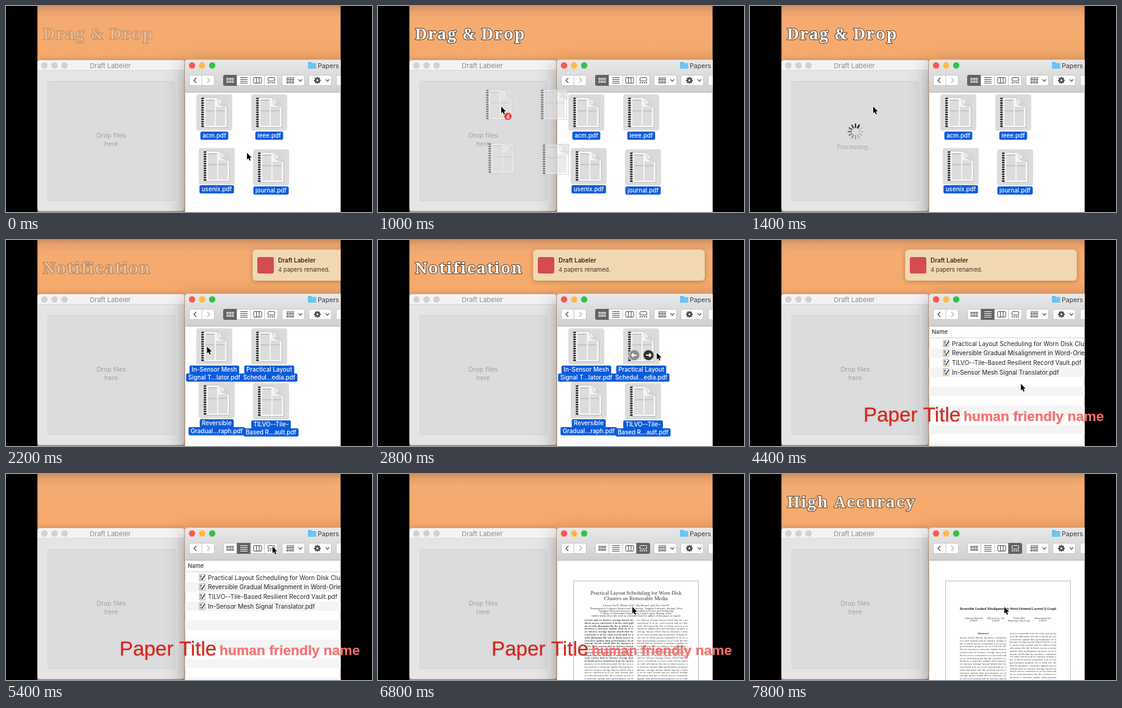
Recreate the animation shown at these times as an HTML page with a canvas. Size 600 by 338 pixels, loop 8000 ms.

```html
<!DOCTYPE html>
<html lang="en">
<head>
<meta charset="utf-8">
<title>Drag and drop renaming</title>
<style>
html, body { margin: 0; width: 100%; height: 100%; overflow: hidden; background: #000; }
canvas { display: block; }
</style>
</head>
<body>
<canvas id="stage" width="600" height="338"></canvas>
<script>
const ctx = document.getElementById('stage').getContext('2d');
const LOOP = 8000, STEP = 200;
const UI = 'Inter, sans-serif', SERIF = '"Liberation Serif", serif';
const APP = 'Draft Labeler';

const files = [
  { x: 312, y: 145, old: 'acm.pdf', label: ['In-Sensor Mesh', 'Signal T...lator.pdf'] },
  { x: 402, y: 145, old: 'ieee.pdf', label: ['Practical Layout', 'Schedul...edia.pdf'] },
  { x: 316, y: 233, old: 'usenix.pdf', label: ['Reversible', 'Gradual...raph.pdf'] },
  { x: 405, y: 235, old: 'journal.pdf', label: ['TILVO--Tile-', 'Based R...ault.pdf'] },
];
const listing = [
  'Practical Layout Scheduling for Worn Disk Clusters.pdf',
  'Reversible Gradual Misalignment in Word-Oriented.pdf',
  'TILVO--Tile-Based Resilient Record Vault.pdf',
  'In-Sensor Mesh Signal Translator.pdf',
];
const pointerPath = [
  [0, 395, 241], [400, 345, 178], [1000, 202, 165], [1800, 202, 165],
  [2600, 457, 185], [2800, 457, 185], [3400, 390, 121], [3600, 390, 121],
  [4400, 444, 236], [4800, 444, 236], [5400, 437, 119], [5600, 437, 119],
  [6400, 417, 218], [8000, 417, 218],
];
const words = ('the storage of system data is memory to layout with and performance in a block which ' +
  'allocation we propose for structure access that file latency on each update consistent by').split(' ');

const clamp = v => Math.max(0, Math.min(1, v));
const ease = (t, from, to) => { const p = clamp((t - from) / (to - from)); return p * p * (3 - 2 * p); };
const mix = (a, b, p) => a + (b - a) * p;

function pointerAt(t) {
  const i = Math.max(1, pointerPath.findIndex(k => k[0] > t));
  const [t0, x0, y0] = pointerPath[i - 1], [t1, x1, y1] = pointerPath[i];
  const p = ease(t, t0, t1);
  return [mix(x0, x1, p), mix(y0, y1, p)];
}

function scoped(draw) { ctx.save(); draw(); ctx.restore(); }

function box(x, y, w, h, r, fill, stroke) {
  ctx.beginPath();
  ctx.roundRect(x, y, w, h, r);
  if (fill) { ctx.fillStyle = fill; ctx.fill(); }
  if (stroke) { ctx.strokeStyle = stroke; ctx.lineWidth = 1; ctx.stroke(); }
}

function dot(x, y, r, fill) {
  ctx.beginPath();
  ctx.arc(x, y, r, 0, 7);
  ctx.fillStyle = fill;
  ctx.fill();
}

function path(points, color, width = 1, fill) {
  ctx.beginPath();
  points.forEach(([x, y]) => ctx.lineTo(x, y));
  if (fill) { ctx.closePath(); ctx.fillStyle = fill; ctx.fill(); }
  if (color) { ctx.strokeStyle = color; ctx.lineWidth = width; ctx.stroke(); }
}

function text(s, x, y, font, color, align = 'left') {
  ctx.font = font;
  ctx.textAlign = align;
  ctx.fillStyle = color;
  ctx.fillText(s, x, y);
}

function vertical(y0, y1, ...stops) {
  const g = ctx.createLinearGradient(0, y0, 0, y1);
  stops.forEach(([at, color]) => g.addColorStop(at, color));
  return g;
}

function title(s, alpha) {
  if (alpha <= 0) return;
  scoped(() => {
    ctx.globalAlpha = alpha;
    ctx.font = '800 26px "Noto Serif", serif';
    ctx.letterSpacing = '1.6px';
    ctx.textAlign = 'left';
    ctx.lineJoin = 'round';
    ctx.lineWidth = 2;
    ctx.strokeStyle = '#4a3c30';
    ctx.strokeText(s, 60.5, 55);
    ctx.fillStyle = '#fff';
    ctx.fillText(s, 60.5, 55);
  });
}

function dropWindow(t) {
  box(51.5, 88.5, 241, 248, 4, '#e6e5e6', '#c9b09b');
  box(52, 89, 240, 17, [4, 4, 0, 0], '#f4f3f4');
  ctx.fillStyle = '#d8d7d8';
  ctx.fillRect(52, 105, 240, 1);
  [63, 79.5, 96].forEach(x => dot(x, 97.5, 5.2, '#d2d1d2'));
  text(APP, 171, 101.7, '11px ' + UI, '#8c8b8c', 'center');
  box(68.5, 123.5, 208, 196, 3, '#dcdbdd', '#d3d2d4');
  if (t >= 1200 && t < 2200) {
    const turn = Math.floor((t - 1400) / 83);
    for (let i = 0; i < 12; i++) scoped(() => {
      ctx.translate(173, 206);
      ctx.rotate((i + turn + 2) * Math.PI / 6);
      const shade = Math.round(mix(195, 15, (i / 11) ** 1.8));
      ctx.lineCap = 'round';
      path([[0, -7], [0, -12]], `rgb(${shade},${shade},${shade})`, 2.3);
    });
    text('Processing...', 172, 235, '9.7px ' + UI, '#a9a8aa', 'center');
  } else {
    text('Drop files', 172.5, 216, '10.6px ' + UI, '#a3a2a4', 'center');
    text('here', 172.5, 230, '10.6px ' + UI, '#a3a2a4', 'center');
  }
}

// Rows of small outlined tiles, three to a row.
function tiles(x, y, rows, color) {
  ctx.strokeStyle = color;
  ctx.lineWidth = .9;
  for (let i = 0; i < rows * 3; i++)
    ctx.strokeRect(x - 5.5 + (i % 3) * 4.3, y + Math.floor(i / 3) * 4.6, 2.4, 2.4);
}

function viewGlyph(i, x, color) {
  if (i === 0) tiles(x, 118.5, 2, color);
  if (i === 1) [117.5, 120.5, 123.5, 126.5].forEach(y => path([[x - 6, y], [x + 6, y]], color));
  if (i === 2) {
    box(x - 6.5, 117.5, 13, 9, 1, null, color);
    [x - 2, x + 2.5].forEach(v => path([[v, 118], [v, 126]], color));
  }
  if (i === 3) {
    box(x - 5.5, 117.5, 11, 5.5, 1, null, color);
    ctx.fillStyle = color;
    for (let k = 0; k < 4; k++) ctx.fillRect(x - 6 + k * 3.4, 125, 1.8, 1.8);
  }
}

function chevron(x, y, dx, dy, color) {
  const side = dx ? [[x - dx, y - 4], [x + dx, y], [x - dx, y + 4]] : [[x - 3, y - dy], [x, y + dy], [x + 3, y - dy]];
  path(side, color, 1.3);
}

function toolbar(view) {
  const ink = '#4c4b4c', edge = '#c6c5c6';
  box(293.5, 88.5, 270, 53, [4, 0, 0, 0], vertical(88, 141, [0, '#e9e8e9'], [1, '#d1d0d1']));
  ctx.fillStyle = '#b5b4b5';
  ctx.fillRect(293.5, 141, 257, 1);
  dot(305, 97.5, 5.2, '#fc5753');
  dot(321.5, 97.5, 5.2, '#fdbc40');
  dot(338, 97.5, 5.2, '#34c24a');
  box(495, 92, 6, 4, 1, '#55b5e5');
  box(495, 93.5, 13.5, 9.5, 1, '#6cc5f1');
  text('Papers', 511, 101.7, '10.6px ' + UI, '#3b3a3b');

  [[300, 42], [356, 90], [452, 38], [496, 38], [541, 30]].forEach(([x, w]) =>
    box(x + .5, 113.5, w - 1, 17, 3, '#fcfcfc', edge));
  path([[321, 114], [321, 131]], edge);
  chevron(310, 122, -2, 0, ink);
  chevron(332, 122, 2, 0, '#b5b4b5');
  for (let i = 0; i < 4; i++) {
    const x = 356 + i * 22.5;
    if (i) path([[x, 114], [x, 130]], edge);
    if (i === view) box(x, 113, 22.5, 18, [i ? 0 : 3, i < 3 ? 0 : 3, i < 3 ? 0 : 3, i ? 0 : 3], '#646364');
    viewGlyph(i, x + 11.5, i === view ? '#fff' : ink);
  }
  path([[460, 117.3], [472.5, 117.3]], ink, .9);
  tiles(466, 119.5, 2, ink);
  chevron(482.5, 122, 0, 1.6, ink);
  for (let i = 0; i < 8; i++) scoped(() => {
    ctx.translate(510.5, 122);
    ctx.rotate(i * Math.PI / 4);
    path([[0, -3], [0, -5.6]], ink, 2);
  });
  dot(510.5, 122, 4.4, ink);
  dot(510.5, 122, 1.7, '#fcfcfc');
  chevron(527, 122, 0, 1.6, ink);
}

function documentIcon(x, y) {
  box(x + 10.5, y + 5, 40, 49.5, 0, '#f4f4f4', '#bbb');
  for (let i = 0; i < 22; i++) {
    ctx.fillStyle = i === 0 || i === 9 ? '#999' : '#c6c6c6';
    const top = y + 9 + i * 1.95;
    ctx.fillRect(x + 15, top, 15, 1);
    if (i > 5) ctx.fillRect(x + 32, top, 15, 1);
  }
  path([[x + 34, y + 4], [x + 52, y + 4], [x + 52, y + 22]], null, 1, '#d9d9d9');
  path([[x + 34, y + 4.5], [x + 37, y + 17], [x + 51, y + 21]], '#cdcdcd', 1, '#eeeeee');
  path([[x + 37, y + 17], [x + 44, y + 10.5], [x + 51, y + 21]], null, 1, '#d4d4d4');
  for (let i = 0; i < 13; i++) box(x + 8, y + 5.5 + i * 3.8, 4.6, 2.3, 1, '#222');
}

function iconView(renamed, arrows) {
  for (const { x, y, old, label } of files) {
    box(x, y, 59, 59.5, 4, '#dddcdd');
    documentIcon(x, y);
    const lines = renamed ? label : [old];
    const font = '500 9.8px ' + UI;
    ctx.font = font;
    lines.forEach((line, i) => {
      const w = ctx.measureText(line).width + 7;
      box(x + 29.5 - w / 2, y + 61 + i * 13, w, 13.6, 2.5, '#0b5bdc');
    });
    lines.forEach((line, i) => text(line, x + 29.5, y + 71.3 + i * 13, font, '#fff', 'center'));
  }
  if (arrows) [[420, -1, '#8d8d8d'], [443.5, 1, '#333']].forEach(([x, d, fill]) => {
    dot(x, 189, 9.5, '#d8d8d8');
    dot(x, 189, 8.3, fill);
    path([[x - 4 * d, 189], [x + 4 * d, 189]], '#fff', 1.8);
    path([[x + d, 186], [x + 4 * d, 189], [x + d, 192]], '#fff', 1.8);
  });
}

function listView() {
  ctx.fillStyle = '#f4f4f5';
  for (let y = 178; y < 338; y += 31.2) ctx.fillRect(293.5, y, 257, 15.6);
  text('Name', 298, 154, '500 9.4px ' + UI, '#333');
  ctx.fillStyle = '#d4d3d4';
  ctx.fillRect(293.5, 160, 257, 1);
  listing.forEach((name, i) => {
    const y = 170 + i * 15.6;
    box(317, y - 5.5, 9, 11, 0, '#fff', '#aaa');
    box(318, y - 4, 3, 4, 0, '#5a9ed0');
    box(318, y + 1, 5, 3, 0, '#d9a44a');
    path([[326, y - 4], [321, y + 4]], '#4b4038', 1.6);
    text(name, 331, y + 3.7, '10px ' + UI, '#272627');
  });
}

// Justified filler text; each line packs in every word that still fits.
function column(x, y, w, seed, boldLines = 0) {
  for (let row = 0; y < 342; row++, y += 4.8) {
    ctx.font = `${row < boldLines ? 'bold ' : ''}4.6px ${SERIF}`;
    const line = [];
    for (let k = 0; k < words.length; k++) {
      const next = words[(seed + row * 11 + k * 7) % words.length];
      if (ctx.measureText([...line, next].join(' ')).width <= w) line.push(next);
    }
    const s = line.join(' ');
    scoped(() => {
      ctx.wordSpacing = (w - ctx.measureText(s).width) / Math.max(1, line.length - 1) + 'px';
      ctx.fillStyle = '#4a4a4a';
      ctx.textAlign = 'left';
      ctx.fillText(s, x, y);
    });
  }
}

function firstPage() {
  const centre = (s, y, size) => text(s, 423, y, `${size}px ${SERIF}`, '#333', 'center');
  centre('Practical Layout Scheduling for Worn Disk', 197.5, 8.6);
  centre('Clusters on Removable Media', 206.7, 8.6);
  centre('Lorvan Teel¹, Miska Ody¹, Hu Brenn², and Tavi Sorel¹', 217, 5);
  centre('¹Department of Computer Science and Technology, Tsinghua University, Beijing, China', 221.8, 4.3);
  centre('¹Tsinghua National Laboratory for Information Science and Technology', 226, 4.3);
  centre('²College of Information Engineering, Capital region, Beijing, China', 230, 4.3);
  centre('further details about this work are available from the authors of this paper on request', 234, 4.3);
  column(338.5, 241, 80, 3, 15);
  column(425, 241, 82.5, 17);
}

function secondPage() {
  text('Reversible Gradual Misalignment in Word-Oriented Layered Q-Graph', 423, 223, `bold 5.2px ${SERIF}`, '#222', 'center');
  [['Dorian Halvek', 'UNIST', 367], ['Wynn-Lee Tor', 'UNIST', 403],
   ['Yorin Bel', 'Hanyang University', 441], ['Basmund Orr', 'UNIST', 480]].forEach(([name, place, x]) => {
    text(name, x, 237.5, `5px ${SERIF}`, '#444', 'center');
    text(place, x, 242, `italic 4.6px ${SERIF}`, '#444', 'center');
  });
  text('Abstract', 382, 263, `bold 5px ${SERIF}`, '#333', 'center');
  column(344, 270, 76, 8);
  column(426, 263, 76, 21);
}

function galleryView(second) {
  box(320.5, 175.5, 205, 180, 0, '#fff', '#bcbbbc');
  second ? secondPage() : firstPage();
}

function finder(t) {
  const view = t < 3600 ? 0 : t < 5600 ? 1 : 3;
  scoped(() => {
    ctx.shadowColor = 'rgba(0,0,0,.38)';
    ctx.shadowBlur = 30;
    ctx.shadowOffsetY = 8;
    box(293.5, 88.5, 270, 270, [4, 0, 0, 0], '#fff');
  });
  toolbar(view);
  if (view === 0) iconView(t >= 2200, t >= 2600 && t < 3200);
  if (view === 1) listView();
  if (view === 3) galleryView(t >= 7400);
}

function notification(t) {
  const x = 254 + 300 * (1 - ease(t, 1900, 2500) + ease(t, 4700, 5300));
  if (x > 549) return;
  scoped(() => {
    ctx.shadowColor = 'rgba(90,45,0,.4)';
    ctx.shadowBlur = 7;
    ctx.shadowOffsetY = 1;
    box(x, 15.5, 282, 51.5, 6, '#f2d8b2');
  });
  box(x + .5, 16, 281, 50.5, 6, null, '#e6c699');
  box(x + 8, 28, 27, 27, 3, '#d44c50');
  text(APP, x + 42, 36.7, '600 9.9px ' + UI, '#332b22');
  text('4 papers renamed.', x + 42, 51.7, '9.5px ' + UI, '#40362a');
}

function draggedFiles(t, px, py) {
  if (t < 400 || t > 1000) return;
  scoped(() => {
    ctx.globalAlpha = .5;
    for (const { x, y } of files) documentIcon(x + px - 345, y + py - 178);
  });
  dot(px + 11, py + 16, 6, '#f13b35');
  text('4', px + 11, py + 19.5, '600 9px ' + UI, '#fff', 'center');
}

function pointer(x, y) {
  const shape = [[0, 0], [0, 11], [2.4, 8.8], [4.2, 12.8], [6, 12], [4.3, 8], [7.6, 7.8]]
    .map(([a, b]) => [x + a, y + b]);
  path([...shape, shape[0]], '#fff', 1.2, '#000');
  path(shape, null, 1, '#000');
}

function caption(s, x, y, font, color, shown, gone) {
  if (shown <= 0 || gone >= 1) return;
  scoped(() => {
    const zoom = 1 + 1.2 * (1 - shown) + 1.2 * gone;
    ctx.globalAlpha = shown * (1 - gone);
    ctx.translate(383, 288);
    ctx.scale(zoom, zoom);
    ctx.translate(-383, -288);
    ctx.shadowColor = 'rgba(120,20,10,.3)';
    ctx.shadowBlur = 2;
    text(s, x, y, font, color);
  });
}

function draw(t) {
  ctx.fillStyle = '#000';
  ctx.fillRect(0, 0, 600, 338);
  scoped(() => {
    ctx.beginPath();
    ctx.rect(51.5, 0, 497, 338);
    ctx.clip();
    ctx.fillStyle = vertical(0, 338, [0, '#cf9160'], [.025, '#e6a26b'], [.06, '#f5ab71'], [.3, '#f6a96a'], [1, '#dd8950']);
    ctx.fillRect(51, 0, 498, 338);
    scoped(() => {
      ctx.shadowColor = 'rgba(0,0,0,.25)';
      ctx.shadowBlur = 10;
      box(52, 89, 240, 247, 4, '#e6e5e6');
    });
    dropWindow(t);
    finder(t);
    notification(t);
    title('Drag & Drop', Math.min(mix(.25, 1, ease(t, 0, 600)), 1 - ease(t, 1600, 2000)));
    title('Notification', Math.min(ease(t, 2000, 2500), 1 - ease(t, 3300, 3800)));
    title('High Accuracy', .85 * ease(t, 7300, 7800));
    const [x, y] = pointerAt(t);
    draggedFiles(t, x, y);
    pointer(x, y);
  });
  const gone = ease(t, 7200, 7700);
  caption('Paper Title', 186, 297.6, '33.2px "Liberation Sans", sans-serif', '#d9231a', ease(t, 3400, 4000), gone);
  caption('human friendly name', 350, 296.6, 'bold 22.9px "Liberation Sans", sans-serif', '#fa6f6c', ease(t, 3600, 4300), gone);
}

let shownAt = -1;
function tick(now) {
  const t = Math.floor((now % LOOP) / STEP) * STEP;
  if (t !== shownAt) draw(shownAt = t);
  requestAnimationFrame(tick);
}
draw(0);
requestAnimationFrame(tick);
</script>
</body>
</html>
```
